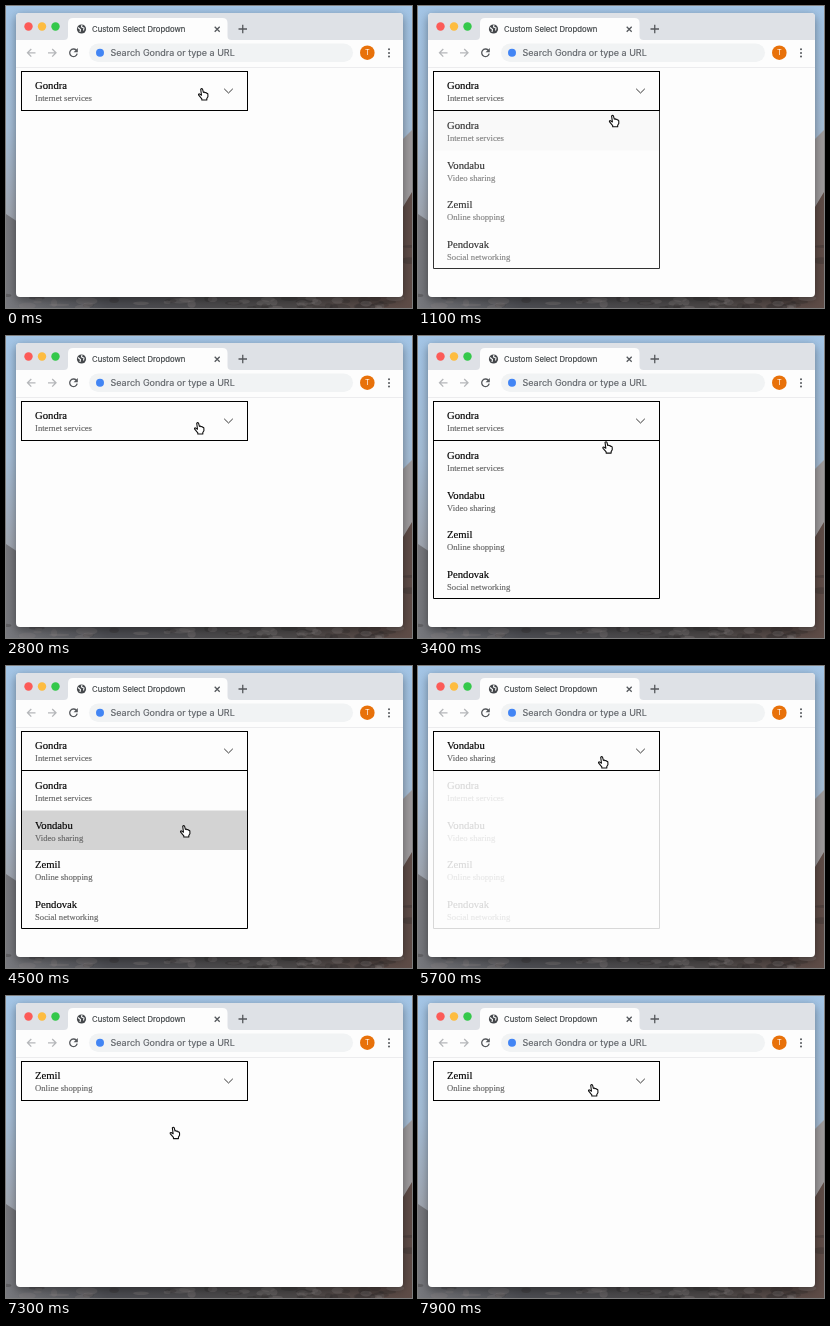
Animation, 406 px wide and 302 px high, one loop 8000 ms. Source, as an HTML page:

```html
<!DOCTYPE html>
<html lang="en">
<head>
<meta charset="utf-8">
<title>Custom Select Dropdown</title>
<style>
  html, body { margin: 0; width: 100%; height: 100%; overflow: hidden; background: #8fa9c4; }
  svg { display: block; width: 100%; height: 100%; }
  text { font-family: Inter, Roboto, sans-serif; stroke-width: .15; }
  .name { font: 10.7px "Liberation Serif", Times, serif; fill: #000; stroke: #000; }
  .note { font: 8.67px "Liberation Serif", Times, serif; fill: #666; stroke: #666; }
  .line { fill: none; stroke: #000; stroke-width: 1; }
  .icon { fill: none; stroke: #55585c; stroke-width: 1.3; }
  #win { filter: drop-shadow(0 3px 5px rgba(0, 0, 0, .4)); }
</style>
</head>
<body>
<svg viewBox="0 0 406 302" preserveAspectRatio="none">
  <defs>
    <linearGradient id="sky" x2="0" y2="1">
      <stop offset="0" stop-color="#a3c5e6"/>
      <stop offset=".4" stop-color="#a5bdd6"/>
      <stop offset=".7" stop-color="#a0a6b0"/>
      <stop offset="1" stop-color="#77797f"/>
    </linearGradient>
    <linearGradient id="rock">
      <stop offset="0" stop-color="#77787d"/>
      <stop offset=".25" stop-color="#4c4d52"/>
      <stop offset=".7" stop-color="#4b4848"/>
      <stop offset="1" stop-color="#5f4c47"/>
    </linearGradient>
  </defs>

  <rect width="406" height="302" fill="url(#sky)"/>
  <path d="M390 140L406 124V220H390Z" fill="#9d9a9c"/>
  <path d="M0 208L12 216V288H394V206L406 186V302H0Z" fill="url(#rock)"/>
  <g id="stones"></g>

  <g id="win"><rect x="10" y="7" width="387" height="284" rx="4" fill="#fdfdfd"/></g>
  <path d="M10 34V11Q10 7 14 7H393Q397 7 397 11V34Z" fill="#dee1e6"/>
  <path d="M58 34Q62 34 62 30V17Q62 12 67 12H216.500Q221.500 12 221.500 17V30Q221.500 34 225.500 34Z" fill="#fdfdfd"/>
  <path d="M10 61.500H397" stroke="#ececee"/>
  <g id="lights"></g>

  <circle cx="75.500" cy="23" r="4.600" fill="#44474b"/>
  <path d="M72 21.500L74.500 23.500 74 26M76 19L75.500 21 78 22 77.500 24.500" fill="none" stroke="#fdfdfd" stroke-width="1.100"/>
  <text x="86" y="26" font-size="7.750" fill="#3c4043" stroke="#3c4043">Custom Select Dropdown</text>
  <path class="icon" d="M208.700 20.700L213.700 25.700M213.700 20.700L208.700 25.700M232.500 23H241M236.750 18.750V27.250"/>

  <path class="icon" style="stroke:#b5b7ba" d="M29.500 46.800H21.500M25.300 43L21.500 46.800 25.300 50.600M42 46.800H50M46.200 43L50 46.800 46.200 50.600"/>
  <path class="icon" d="M70.300 44.200A3.800 3.800 0 1 0 71.200 47.700"/>
  <path d="M71.800 42V46.200H67.600Z" fill="#55585c"/>
  <rect x="83" y="37.500" width="264" height="18.500" rx="9.250" fill="#f1f3f4"/>
  <circle cx="94" cy="46.800" r="4" fill="#4285f4"/>
  <text x="104.500" y="50" font-size="9" fill="#5f6368" stroke="#5f6368">Search Gondra or type a URL</text>
  <circle cx="361.300" cy="46.700" r="7.300" fill="#e8710a"/>
  <text x="361.300" y="49.300" font-size="7.300" fill="#fff" text-anchor="middle">T</text>
  <path d="M383 43.300h.01M383 46.900h.01M383 50.500h.01" stroke="#55585c" stroke-width="2" stroke-linecap="round"/>

  <g id="list">
    <g id="rows"></g>
    <path class="line" d="M15.500 105V262.500H241.500V105"/>
  </g>
  <rect class="line" x="15.500" y="65.500" width="226" height="39"/>
  <text class="name" id="pickName" x="29" y="83"/>
  <text class="note" id="pickNote" x="29" y="95"/>
  <path d="M218.200 82.800L222.500 87 226.800 82.800" fill="none" stroke="#222" stroke-width=".9"/>

  <path id="hand" d="M-2.300 -4.700Q-1.300 -6 -.4 -4.700L.4 -1.600Q1.300 -2.300 2 -1.300 2.900 -1.900 3.500 -.7 4.800 -1 4.900 .6V2.700L3.800 4.500V6H-1.200V4.800L-4.300 1.200Q-4.900 0 -3.600 -.1L-1.500 1.200Z" fill="#fff" stroke="#111" stroke-width="1.100" stroke-linejoin="round"/>
</svg>

<script>
const LOOP = 8000, TOP = 105, ROW = 39.5;
const MOVE = 600, FADE = 500, HOVER = 400;
const $ = id => document.getElementById(id);
const options = [
  ["Gondra", "Internet services"],
  ["Vondabu", "Video sharing"],
  ["Zemil", "Online shopping"],
  ["Pendovak", "Social networking"],
];

// Pointer stops as [arrival, x, y]; each move takes MOVE ms
const stops = [
  [0, 197, 88], [1300, 195.5, 124], [2750, 193, 92], [3800, 179, 165],
  [5400, 185, 96], [6320, 158, 208], [7550, 175, 94],
];
// Clicks open and close the list in turn
const clicks = [700, 1970, 2900, 4650, 5630, 6800];

$("rows").innerHTML = options.map(([name, note], i) => `
  <g transform="translate(0 ${TOP + i * ROW})">
    <rect x="16" width="225" height="${ROW}" fill="#d3d3d3"/>
    <text class="name" x="29" y="18">${name}</text>
    <text class="note" x="29" y="30">${note}</text>
  </g>`).join("");
const fills = document.querySelectorAll("#rows rect");

$("lights").innerHTML = ["#fc5b57", "#fdbc40", "#34c84a"].map((color, i) =>
  `<circle cx="${22.5 + i * 13.5}" cy="20.5" r="4.2" fill="${color}"/>`).join("");

let seed = 7;
const random = () => (seed = seed * 16807 % 2147483647) / 2147483647;
for (let i = 0; i < 60; i++) {
  const x = random() * 406, y = x < 12 || x > 394 ? 225 + random() * 70 : 292 + random() * 10;
  $("stones").innerHTML += `<ellipse cx="${x}" cy="${y}" rx="${3 + random() * 8}" ry="${1 + random() * 3}"
    fill="${i % 2 ? "#8c8686" : "#2e2b2c"}" opacity=".3"/>`;
}

function pointer(t) {
  let [, x, y] = stops[0];
  for (const [arrival, toX, toY] of stops.slice(1)) {
    const u = Math.min(1, Math.max(0, (t - arrival) / MOVE + 1));
    const e = u * u * (3 - 2 * u);
    x += (toX - x) * e;
    y += (toY - y) * e;
  }
  return [x, y];
}

const clicksBy = t => clicks.filter(at => at <= t).length;
const isOpen = t => clicksBy(t) % 2 === 1;
const rowAt = t => Math.floor((pointer(t)[1] - 5 - TOP) / ROW);

// Share of the last `span` ms in which a state held: a linear transition
function blend(state, t, span, steps = 50) {
  let held = 0;
  for (let i = 0; i < steps; i++) held += state(t - (i + .5) * span / steps);
  return held / steps;
}

function picked(t) {
  const closes = Math.floor(clicksBy(t) / 2);
  return closes ? rowAt(clicks[closes * 2 - 1]) : 0;
}

function draw(t) {
  $("hand").setAttribute("transform", `translate(${pointer(t)})`);
  $("list").setAttribute("opacity", blend(isOpen, t, FADE));
  fills.forEach((fill, i) =>
    fill.setAttribute("opacity", blend(at => rowAt(at) === i, t, HOVER)));
  [$("pickName").textContent, $("pickNote").textContent] = options[picked(t)];
}

const start = performance.now();
function tick() {
  draw((performance.now() - start) % LOOP);
  requestAnimationFrame(tick);
}
tick();
</script>
</body>
</html>
```
